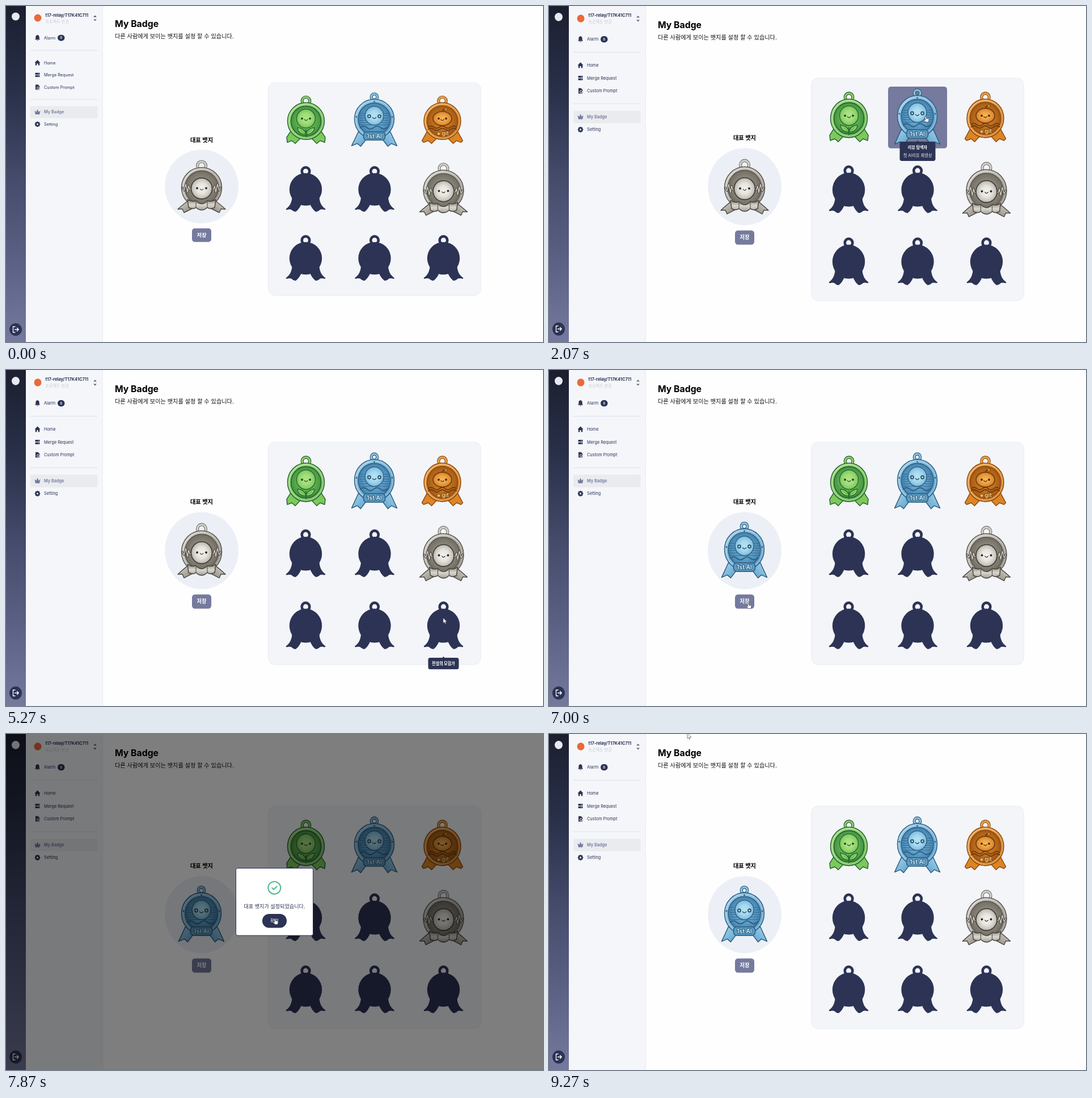
Write an HTML page that moves like this. It is 947x592 px and loops after 9.34 s.

```html
<!DOCTYPE html>
<html lang="ko">
<head>
<meta charset="utf-8">
<title>My Badge</title>
<style>
  html, body { margin: 0; width: 100%; height: 100%; overflow: hidden; background: #fefefe; }
  svg { display: block; width: 947px; height: 592px; }
  text { font-family: Inter, "Noto Sans CJK KR", "Noto Sans CJK", sans-serif; white-space: pre; }
  .round { stroke-linecap: round; stroke-linejoin: round; }
</style>
</head>
<body>
<svg id="stage" viewBox="0 0 947 592"></svg>
<script>
const NAVY = '#2c3354', MUTED = '#757a9e', LOOP = 9340, STRETCH = 1.045;
const COLS = [528.5, 650, 771.5], ROWS = [201.3, 322.8, 444.3], HALF = 52;

const text = (x, y, str, size, fill = NAVY, weight = 400, anchor = 'start') =>
  `<text x="${x}" y="${y + size * .36}" font-size="${size}" fill="${fill}" font-weight="${weight}" text-anchor="${anchor}">${str}</text>`;
const rect = (x, y, w, h, r, fill, more = '') =>
  `<rect x="${x}" y="${y}" width="${w}" height="${h}" rx="${r}" fill="${fill}" ${more}/>`;
const circle = (x, y, r, fill, stroke = 'none', width = 1) =>
  `<circle cx="${x}" cy="${y}" r="${r}" fill="${fill}" stroke="${stroke}" stroke-width="${width}"/>`;
const line = (d, stroke, width = 1, fill = 'none') =>
  `<path class="round" d="${d}" fill="${fill}" stroke="${stroke}" stroke-width="${width}"/>`;
const shape = (d, fill) => `<path d="${d}" fill="${fill}" fill-rule="evenodd"/>`;
const group = (x, y, body) => `<g transform="translate(${x} ${y})">${body}</g>`;
const mirrored = body => body + `<g transform="scale(-1 1)">${body}</g>`;
const colorStops = colors => colors.map((c, i) =>
  `<stop offset="${i / (colors.length - 1)}" stop-color="${c}"/>`).join('');
const gradient = (id, colors, x2 = 0) =>
  `<linearGradient id="${id}" x2="${x2}" y2="1">${colorStops(colors)}</linearGradient>`;
const glow = (id, colors) => `<radialGradient id="${id}">${colorStops(colors)}</radialGradient>`;

const loop = (y, r, color, dark) =>
  circle(0, y, r, 'none', dark, 5.2) + circle(0, y, r, 'none', color, 3);
// Raised rim around a sunken field
const medal = (y, r, inner, metal, dark) =>
  circle(0, y, r, `url(#${metal})`, dark, 1.5) +
  circle(0, y, r - 2.2, 'none', 'rgba(255,255,255,.3)', 1.2) +
  circle(0, y, inner, `url(#${metal}Field)`, dark, 1.8);
const face = (y, gap, color) =>
  mirrored(circle(gap, y, 1.9, color)) + line(`M-2.6 ${y + 1.5}Q0 ${y + 5} 2.6 ${y + 1.5}`, color, 1.2);
const tails = (d, fill, dark) => mirrored(line(d, dark, 1.4, fill));
const relief = (x, y, str, size, fill, dark) =>
  `<g paint-order="stroke" stroke="${dark}" stroke-width="1.8">${text(x, y, str, size, fill, 700, 'middle')}</g>`;
const SHORT_TAIL = 'M-26 18L-34 30L-33 39L-25 36L-19 41L-10 32Z';
const PULSE = 'M18 5H21L23-1L25 10L28-4L31 7L34 2';

const badges = {
  green: () => group(.5, 0,
    tails(SHORT_TAIL, '#7cc95b', '#235c30') + loop(-34, 6.8, '#8ed068', '#235c30') +
    medal(1.5, 32.5, 26.5, 'green', '#2a6636') +
    circle(0, -3, 16.5, 'url(#lime)', '#2c6d35', 1.5) + face(-3, 7, '#20472a') +
    mirrored(line('M0 25Q2 14 15 13Q14 24 0 25', '#23622f', 1.2, '#8ad568') + line('M2 23L10 17', '#3c8540', .8)) +
    line('M0 17V29', '#23622f', 1.5)),

  blue: () => group(-.5, 0,
    tails('M-28 20L-40 45L-30 41L-24 46L-13 32Z', 'url(#blue)', '#285778') + loop(-41, 5.3, '#89c4e5', '#305e7b') +
    medal(-2, 35, 28.5, 'blue', '#33658a') +
    [-12, -8, -4, 0, 4, 8].map(y => line(`M-26 ${y}H26`, '#33698f', 1)).join('') +
    line('M-25 13Q-19 8-13 13T-1 13T11 13T24 12', '#2d6288', 2) +
    mirrored(circle(31.5, -6, 1.4, '#2f5d7d')) + circle(0, -33, 1.4, '#2f5d7d') +
    circle(0, -8, 16.5, 'url(#sky)', '#2f6487', 1.5) +
    mirrored(circle(9, -7, 2.5, '#a8dbf0', '#24465f', 1.6)) + line('M-3-5Q0-1 3-5', '#24465f', 1.3) +
    rect(-19, 20.5, 38, 14.5, 5.5, '#5b9cc6', 'stroke="#2c5b7b" stroke-width="1.5"') +
    relief(0, 27.8, '1st AI', 10.3, '#c8e9f5', '#2b5877')),

  orange: () => group(-2, 0,
    tails(SHORT_TAIL.replace('-34 30', '-36 36'), '#dd8425', '#894812') + loop(-34, 6.8, '#eda347', '#8d4e16') +
    medal(1.5, 32.5, 27, 'orange', '#914d13') +
    line('M1-14Q0-20 5-19', '#72400f', 2.2) + circle(6, -19.5, 2.2, '#e69b3d', '#72400f', .8) +
    '<ellipse cy="-3" rx="16.5" ry="12.5" fill="url(#amber)" stroke="#71390c" stroke-width="1.6"/>' +
    face(-3, 6.5, '#4e2b0e') +
    [12, 16].map(y => line(`M-25 ${y}Q-20 ${y - 4}-15 ${y}T-5 ${y}T5 ${y}T15 ${y}T25 ${y}`, '#713a0d', 1.7)).join('') +
    circle(-6.5, 24, 2.7, '#f2bd69', '#7c4211', .8) +
    relief(5, 23.3, 'git', 10, '#f5c576', '#7c4211')),

  silver: () =>
    loop(-36.5, 7.5, '#d2d0cb', '#77756f') +
    medal(2, 35.5, 29.5, 'silver', '#5f5c56') +
    mirrored(line(PULSE, '#3f3b35', 3.2) + line(PULSE, '#d6d3cc', 1.4)) +
    circle(0, 3.5, 18.5, 'url(#pearl)', '#47433d', 1.8) + face(3, 8, '#2a2724') +
    tails('M-22 24Q-30 29-42 40L-34 39.5L-31 46L-17 39Z', 'url(#silver)', '#4b4842') +
    line('M-25 23Q-17 28-10 25Q0 36 10 25Q17 28 25 23L23 37Q15 41 10 37Q0 46-10 37Q-15 41-23 37Z', '#4b4842', 1.5, 'url(#ribbon)') +
    mirrored(line('M10 25V37', '#5c5852', 1.2)),

  locked: () =>
    circle(0, -31.6, 6.8, 'none', NAVY, 4.6) + circle(0, .3, 28.7, NAVY) +
    mirrored(shape('M-24 15C-25 24-28 30-34.5 34.5Q-35.5 36.5-33 36.3Q-29 35-25.5 36Q-22 39.5-17.5 39.7Q-11 35-7 25Z', NAVY))
};

const cells = [
  ['green', '새싹 리뷰어', '첫 로그인 성공', 59],
  ['blue', '리뷰 탐색자', '첫 AI리뷰 재생성', 63],
  ['orange', '연결 개척자', '첫 저장소 연결', 59],
  ['locked', '리뷰 수집가', '', 48],
  ['locked', '꾸준한 손님', '', 48],
  ['silver', '단골 손님', '서비스 로그인 100회 이상 (1일 1회)', 119],
  ['locked', '병합의 달인', '', 48],
  ['locked', '질문 도전자', '', 48],
  ['locked', '전설의 모험가', '', 54]
].map(([kind, title, note, width], i) =>
  ({ kind, title, note, width, x: COLS[i % 3], y: ROWS[Math.floor(i / 3)] }));

const tooltip = ({ title, note, width, x, y }) => {
  const top = y - HALF + (note ? 92.8 : 106.2);
  return shape(`M${x - 2} ${top}L${x} ${top - 2}L${x + 2} ${top}Z`, NAVY) +
    rect(x - width / 2, top, width, note ? 32.5 : 19.5, 3.5, NAVY) +
    text(x, top + 9.7, title, 7.1, '#fff', 700, 'middle') +
    (note ? text(x, top + 22.8, note, 7.2, '#e9eaf1', 400, 'middle') : '');
};

const icons = {
  bell: shape('M0-5Q3.2-4.5 3.2-1V1.5L4.5 3.2H-4.5L-3.2 1.5V-1Q-3.2-4.5 0-5M-1.5 4H1.5Q0 6-1.5 4', NAVY),
  home: shape('M0-5L5 0H3.7V4.5H1.2V1.5H-1.2V4.5H-3.7V0H-5Z', NAVY),
  merge: rect(-4, -3.8, 8, 3.2, .6, NAVY) + rect(-4, .4, 8, 3.2, .6, NAVY) +
    circle(2, -2.2, .6, '#fff') + circle(2, 2, .6, '#fff'),
  prompt: shape('M-3.5-4.5H1L3.8-1.7V4.5H-3.5Z', NAVY) + circle(1, 1.5, 2, NAVY, '#fff', .9) + line('M2.5 3L4 4.5', '#fff', .9),
  crown: shape('M-5-2.5L-2.2 0L0-4.7L2.2 0L5-2.5L3.7 4.3H-3.7Z', MUTED),
  gear: [0, 45, 90, 135].map(a => `<g transform="rotate(${a})">${rect(-1.2, -4.8, 2.4, 9.6, .6, NAVY)}</g>`).join('') +
    circle(0, 0, 2.6, '#f4f6fa', NAVY, 2.2)
};
const menu = (y, icon, label, fill = NAVY, weight = 400) =>
  group(55.5, y, icons[icon]) + text(67, y, label, 7.3, fill, weight);

const header =
  circle(17, 18.5, 7, '#e8e9f0') + circle(56, 21, 6.5, '#e9693a') +
  text(69.5, 16, 't17-relay/T17K41C711', 7.4, NAVY, 700) +
  text(69.5, 27, '프로젝트 변경', 7.1, '#cdced6') +
  line('M155.3 19.3L157 17.4L158.7 19.3M155.3 23.6L157 25.5L158.7 23.6', NAVY, 1.1) +
  menu(56, 'bell', 'Alarm') + rect(91, 50.8, 12.5, 10.6, 5.3, NAVY) + text(97.2, 56, '8', 6.2, '#fff', 500, 'middle') +
  rect(43, 77.5, 118.5, 1, 0, '#dde1e9') +
  menu(100, 'home', 'Home') + menu(121.5, 'merge', 'Merge Request') + menu(143, 'prompt', 'Custom Prompt') +
  rect(43, 164.2, 118.5, 1, 0, '#dde1e9') + rect(43, 176.5, 118.5, 21, 2, '#e9ebee') +
  menu(186.7, 'crown', 'My Badge', MUTED, 600) + menu(208.3, 'gear', 'Setting') +
  text(192, 31.5, 'My Badge', 15.8, '#000', 700) +
  text(192, 53, '다른 사람에게 보이는 뱃지를 설정 할 수 있습니다.', 10.17, '#111');

const board =
  text(345, 236, '대표 뱃지', 10.25, '#000', 700, 'middle') +
  circle(345, 318, 65, '#ecf0f6') +
  `<g id="oldPick">${group(345, 318, badges.silver())}</g><g id="newPick">${group(345, 318, badges.blue())}</g>` +
  rect(328, 391.8, 34, 24, 5, MUTED) + text(345, 403.8, '저장', 9.3, '#fff', 700, 'middle') +
  rect(462.5, 135, 375, 375, 12, '#f3f5f9', 'stroke="#eaedf2"') +
  cells.map(c => (c.kind === 'locked' ? '' :
    rect(c.x - HALF, c.y - HALF, 2 * HALF, 2 * HALF, 5, MUTED, 'class="highlight"')) +
    group(c.x, c.y, badges[c.kind]())).join('') +
  cells.map(c => `<g class="tip">${tooltip(c)}</g>`).join('');

const logout = circle(17, 570, 11, NAVY) +
  line('M16 565H12.5V575H16M15.5 570H22M19.5 567.3L22.2 570L19.5 572.7', '#fff', 1.3);

const modal = rect(0, 0, 947, 592, 0, '#000', 'fill-opacity=".5"') +
  rect(405.5, 236.5, 136, 118.5, 3, '#fff', `stroke="${NAVY}"`) +
  circle(473.3, 271, 11, 'none', '#55b990', 2) + line('M469.2 271.3L472 274L477.6 268.5', '#55b990', 2) +
  text(473.5, 303.5, '대표 뱃지가 설정되었습니다.', 9.1, NAVY, 400, 'middle') +
  rect(452, 317, 43, 24.5, 12, NAVY) + text(473.5, 329, '확인', 8.2, '#fff', 500, 'middle');

const arrow = line('M0 0V9L2.1 7.2L3.5 10.3L5 9.6L3.6 6.6H6.4Z', '#4a4a52', .7, '#fff');
const hand = line('M-1 0Q.2-1 1 0L1.6 3.3L4.7 3.6Q6 4 5.8 5.5L5 9.5H.5L-2.4 6Q-2.6 4.6-1.2 5L-.3 5.5Z', '#4a4a52', .7, '#fff');

const paints =
  gradient('rail', ['#1b1f2f', '#293049', '#434a6a', '#5a6083', '#74799d']) +
  gradient('green', ['#a8e283', '#6cbd55'], 1) + glow('greenField', ['#6cbf56', '#62b44f', '#469643']) +
  gradient('blue', ['#a6d6ee', '#5d9fcb'], 1) + glow('blueField', ['#6cacd3', '#62a3cc', '#4683ae']) +
  gradient('orange', ['#f3ae51', '#d07a22'], 1) + glow('orangeField', ['#cf8129', '#c47420', '#a45a14']) +
  gradient('silver', ['#dedbd5', '#b5b1a8', '#8a867d'], 1) + glow('silverField', ['#989387', '#908b80', '#736e64']) +
  gradient('ribbon', ['#8f8b82', '#d9d6cf', '#a5a198']) + glow('pearl', ['#f4f3ef', '#e6e4de', '#bcb8ae']) +
  glow('lime', ['#aee686', '#a1de78', '#7fc75f']) + glow('sky', ['#b5e3f5', '#a6d9ef', '#7fbbdd']) +
  glow('amber', ['#f6b658', '#efa343', '#d3822a']);

const stage = document.getElementById('stage');
stage.innerHTML = `<defs>${paints}</defs>` +
  rect(0, 0, 947, 592, 0, '#fefefe') + rect(35, 0, 135, 592, 0, '#f4f6fa') + rect(170, 0, 1, 592, 0, '#ececf0') +
  rect(0, 0, 35, 592, 0, 'url(#rail)') +
  `<g id="top">${header}</g><g id="mid">${board}</g><g id="foot">${logout}</g>` +
  `<g id="modal">${modal}</g><g id="cursor"><g id="arrow">${arrow}</g><g id="hand">${hand}</g></g>`;

const el = id => document.getElementById(id);
const show = (node, on) => { node.style.display = on ? '' : 'none'; };
const tips = [...document.querySelectorAll('.tip')];
const highlights = [...document.querySelectorAll('.highlight')];
const owned = cells.filter(c => c.kind !== 'locked');

// Pointer stops: time, x, y
const stops = [
  [1070, 390, -12], [1400, 541, 200], [1870, 541, 200], [2070, 664, 195], [2330, 664, 195],
  [2530, 784, 198], [2870, 784, 198], [3130, 782, 300], [3330, 782, 300], [3730, 655, 326],
  [4000, 655, 326], [4130, 541, 330], [4330, 541, 330], [4600, 535, 442], [4900, 652, 442],
  [5200, 771, 437], [5270, 771, 437], [6000, 664, 200], [6330, 664, 200], [7000, 351, 411],
  [7330, 351, 411], [7800, 474, 326], [8400, 474, 326], [9270, 244, -1]
];

function pointer(t) {
  const i = stops.findIndex(s => s[0] > t);
  if (i < 0) return stops[stops.length - 1].slice(1);
  if (i === 0) return [-50, -50];
  const [t0, x0, y0] = stops[i - 1], [t1, x1, y1] = stops[i];
  const p = (t - t0) / (t1 - t0), k = p * p * (3 - 2 * p);
  return [x0 + (x1 - x0) * k, y0 + (y1 - y0) * k];
}

function draw(now) {
  const t = now % LOOP, s = t < 70 ? 1 : STRETCH, midShift = s === 1 ? 0 : 323 - 322.5 * s;
  el('top').setAttribute('transform', `scale(1 ${s})`);
  el('mid').setAttribute('transform', `matrix(1 0 0 ${s} 0 ${midShift})`);
  el('foot').setAttribute('transform', `matrix(1 0 0 ${s} 0 ${592 * (1 - s)})`);

  const [x, y] = pointer(t), open = t >= 7330 && t < 8400;
  const localY = (y - midShift) / s;
  const hovered = open ? undefined :
    cells.find(c => Math.abs(x - c.x) < HALF && Math.abs(localY - c.y) < HALF);
  tips.forEach((node, i) => show(node, cells[i] === hovered));
  highlights.forEach((node, i) => show(node, owned[i] === hovered));

  const picked = t >= 6200;
  show(el('oldPick'), !picked);
  show(el('newPick'), picked);
  show(el('modal'), open);

  const onSave = !open && Math.abs(x - 345) < 17 && Math.abs(y - 408) < 13;
  const onConfirm = open && Math.abs(x - 473.5) < 21 && Math.abs(y - 329) < 12;
  const clickable = owned.includes(hovered) || onSave || onConfirm;
  el('cursor').setAttribute('transform', `translate(${x} ${y})`);
  show(el('hand'), clickable);
  show(el('arrow'), !clickable);
}

const start = performance.now();
function tick() {
  draw(performance.now() - start);
  requestAnimationFrame(tick);
}
tick();
</script>
</body>
</html>
```
